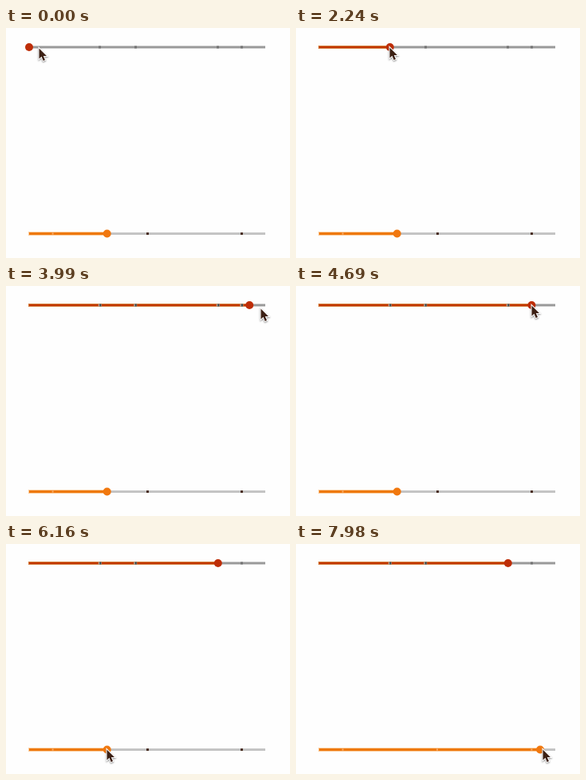
Write an HTML page with a canvas that moves like this. It is 356 px wide and 288 px high and loops after 8000 ms.

```html
<!DOCTYPE html>
<html lang="en">
<head>
<meta charset="utf-8">
<title>Sliders</title>
<style>
  html, body { margin: 0; width: 100%; height: 100%; overflow: hidden; background: #fefefe; }
  canvas { display: block; }
</style>
</head>
<body>
<canvas id="stage" width="356" height="288"></canvas>
<script>
const ctx = document.getElementById('stage').getContext('2d');
const LOOP = 8000, STEP = 70, SNAP_TIME = 290;
const KNOB_LAG = 0.07; // share of a drag by which the knob trails the pointer
const LEFT = 29, RIGHT = 325;

const upper = {
  y: 24, start: LEFT, marks: [0.3, 0.45, 0.8, 0.9], snaps: true, gripY: 0, dropY: 4,
  track: '#9a9a9a', fill: '#c23600', edge: '#d4803f', edgeHeight: 4, coreHeight: 2,
  knob: '#be2e08', mark: '#747474',
  drawPassed(x) {
    box('#b4aaa0', x - 2, this.y - 1.5, 4, 3);
    box('#33474c', x - 0.5, this.y - 1.5, 2, 3);
  }
};

const lower = {
  y: 257.5, start: 126.7, marks: [0.1, 0.5, 0.9], snaps: false, gripY: -0.5, dropY: -0.5,
  track: '#c4c4c4', fill: '#ee780e', edge: '#fbd0a4', edgeHeight: 5, coreHeight: 3,
  knob: '#f1780f', mark: '#4a2f22',
  drawPassed(x) { box('#f8b070', x - 1, this.y - 1, 2, 2); }
};

// Each drag runs from grab to drop; from back to rest the pointer returns to the next grip.
const drags = [
  { slider: upper, grab: 0, drop: 420, knob: 135, pointer: 138, back: 630, rest: 1190 },
  { slider: upper, grab: 1330, drop: 1540, knob: 105, pointer: 104, back: 1820, rest: 2380 },
  { slider: upper, grab: 2450, drop: 2870, knob: 177, pointer: 179, back: 2940, rest: 3360 },
  { slider: upper, grab: 3430, drop: 4110, knob: 325, pointer: 329, back: 4200, rest: 4760 },
  { slider: upper, grab: 4830, drop: 5180, knob: 243, pointer: 246, back: 5320, rest: 6230 },
  { slider: lower, grab: 6580, drop: 6940, knob: 211, pointer: 209, back: 7280, rest: 7420 },
  { slider: lower, grab: 7560, drop: 7980, knob: 307, pointer: 309 }
];

const mix = (a, b, p) => a + (b - a) * p;
const progress = (t, from, to) => (t - from) / (to - from);

function easeInOut(p, power = 2) {
  p = Math.min(1, Math.max(0, p));
  return p < 0.5 ? (2 * p) ** power / 2 : 1 - (2 - 2 * p) ** power / 2;
}

const markX = part => mix(LEFT, RIGHT, part);

function nearestMark(slider, x) {
  return slider.marks.map(markX).reduce((a, b) => Math.abs(b - x) < Math.abs(a - x) ? b : a);
}

// Finished moves stay at their end and later ones at their start, so all can be applied in turn.
function sceneAt(t) {
  const knobs = new Map([[upper, upper.start], [lower, lower.start]]);
  const pointer = { x: 41, y: 25 };
  const movePointer = (x, y, p) => {
    pointer.x = mix(pointer.x, x, p);
    pointer.y = mix(pointer.y, y, p);
  };

  drags.forEach((drag, i) => {
    const { slider } = drag;
    const pull = progress(t, drag.grab, drag.drop);
    const home = slider.snaps ? nearestMark(slider, drag.knob) : drag.knob;
    const pulled = mix(knobs.get(slider), drag.knob, easeInOut(pull - KNOB_LAG));
    const snap = easeInOut((t - drag.back) / SNAP_TIME);
    const next = drags[i + 1];

    movePointer(drag.pointer, slider.y + slider.dropY, easeInOut(pull));
    knobs.set(slider, next ? mix(pulled, home, snap) : pulled);
    if (next) {
      const gripX = next.slider === slider ? home : next.slider.start;
      const glide = easeInOut(progress(t, drag.back, drag.rest), 4);
      movePointer(gripX - 0.5, next.slider.y + next.slider.gripY, glide);
    }
  });
  return { knobs, pointer };
}

function box(color, x, y, w, h) {
  ctx.fillStyle = color;
  ctx.fillRect(x, y, w, h);
}

function drawBar(color, y, from, to, height) {
  box(color, from, y - height / 2, to - from, height);
}

function drawSlider(slider, x) {
  const { y } = slider;
  drawBar(slider.track, y, LEFT, RIGHT, 3);
  drawBar(slider.edge, y, LEFT - 1, x, slider.edgeHeight);
  drawBar(slider.fill, y, LEFT, x, slider.coreHeight);
  for (const mark of slider.marks.map(markX)) {
    if (mark < x) slider.drawPassed(mark);
    else box(slider.mark, Math.round(mark - 1.5), y - 1.5, 3, 3);
  }
  ctx.fillStyle = slider.knob;
  ctx.beginPath();
  ctx.arc(x, y, 5, 0, 2 * Math.PI);
  ctx.fill();
}

const arrow = new Path2D('M0.5 0.5V13.5L3.5 10.8L5.7 16L8 15L5.8 10H10Z');

function drawPointer({ x, y }) {
  ctx.save();
  ctx.translate(Math.round(x), Math.round(y));
  ctx.shadowColor = 'rgba(0, 0, 0, 0.45)';
  ctx.shadowBlur = 2;
  ctx.shadowOffsetY = 1;
  ctx.strokeStyle = '#fff';
  ctx.lineWidth = 2;
  ctx.stroke(arrow);
  ctx.shadowColor = 'transparent';
  ctx.fillStyle = '#3c2014';
  ctx.fill(arrow);
  ctx.restore();
}

function render() {
  const elapsed = performance.now() % LOOP;
  const { knobs, pointer } = sceneAt(Math.floor(elapsed / STEP) * STEP);
  box('#fefefe', 0, 0, 356, 288);
  knobs.forEach((x, slider) => drawSlider(slider, x));
  drawPointer(pointer);
  requestAnimationFrame(render);
}
render();
</script>
</body>
</html>
```
